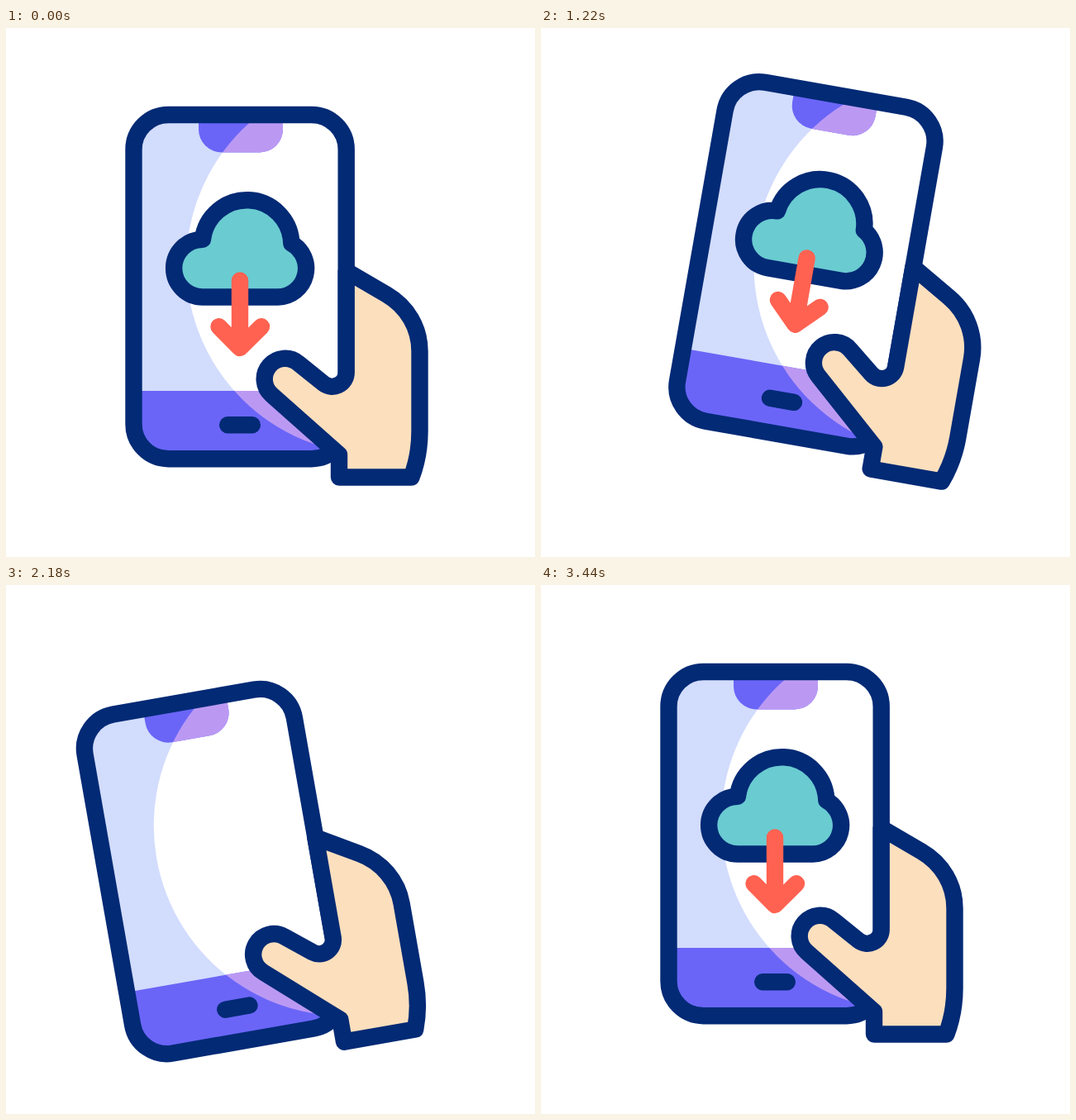
These frames come from a looping animation (640x640 px, 3620 ms). An HTML page:

```html
<!DOCTYPE html>
<html lang="en">
<head>
<meta charset="utf-8">
<title>Cloud download</title>
<style>
  html, body { margin: 0; height: 100%; overflow: hidden; background: #fff; }
  svg { display: block; width: 100%; height: 100%; }
  .line { stroke: #022a75; stroke-width: 20.4; stroke-linecap: round; stroke-linejoin: round; }
  .violet { fill: #6a65f7; }
  .lilac { fill: #bb99f3; }
</style>
</head>
<body>
<svg viewBox="0 0 640 640">
  <defs>
    <clipPath id="screen"><rect x="154.5" y="105" width="257.2" height="416.2" rx="42"/></clipPath>
    <clipPath id="shine"><circle cx="448" cy="286" r="230"/></clipPath>
    <path id="notch" d="M233 100H335V122.500A28 28 0 0 1 307 150.500H261A28 28 0 0 1 233 122.500Z"/>
    <rect id="band" x="150" y="439" width="266" height="90"/>
  </defs>
  <g id="scene">
    <g clip-path="url(#screen)">
      <rect x="150" y="100" width="266" height="426" fill="#d2dcfd"/>
      <circle cx="448" cy="286" r="230" fill="#fff"/>
      <use href="#notch" class="violet"/>
      <use href="#notch" class="lilac" clip-path="url(#shine)"/>
      <path id="cloud" class="line" fill="#6acbd1"
        d="M238 325.500A34.900 34.900 0 0 1 238 255.700A53.850 53.850 0 0 1 345.300 260.500A34.700 34.700 0 0 1 329 325.500Z"/>
      <path id="arrow" fill="none" stroke="#ff6251" stroke-width="20.4" stroke-linecap="round" stroke-linejoin="round"
        d="M283 305.500V387M257.500 361.300L283 387L309 361.300"/>
      <use href="#band" class="violet"/>
      <use href="#band" class="lilac" clip-path="url(#shine)"/>
      <rect x="258" y="470" width="50" height="20.400" rx="10.200" fill="#022a75"/>
    </g>
    <rect class="line" fill="none" x="154.500" y="105" width="257.200" height="416.200" rx="42"/>
    <path class="line" fill="#fcdfbd"
      d="M411.700 294L460.500 322.500C485.500 337 500.500 363 500.500 391V488C500.500 508 497.500 525 490.500 543.500H403V516.200L321.500 443.800A25 25 0 0 1 353.900 405.700L384.200 430.100A17 17 0 0 0 411.700 417Z"/>
  </g>
</svg>
<script>
  const LOOP = 3620;
  const [scene, cloud, arrow] = ['scene', 'cloud', 'arrow'].map(id => document.getElementById(id));

  // Eased progress from 0 to 1 between two times.
  const ease = (t, from, to) => {
    const u = Math.min(1, Math.max(0, (t - from) / (to - from)));
    return u * u * (3 - 2 * u);
  };

  function draw(now) {
    const t = now % LOOP;
    const tilt = 10 * ease(t, 200, 1200) - 20 * ease(t, 1200, 2200) + 10 * ease(t, 2200, 3200);
    scene.setAttribute('transform', `rotate(${tilt} 458.5 513.5)`);

    cloud.setAttribute('opacity', 1 - ease(t, 1700, 2180) + ease(t, 2200, 2700));

    // The arrow drops behind the band, then fades back in from above.
    const back = ease(t, 2700, 3440);
    const shift = t < 2200 ? 147 * ease(t, 1200, 2200) : -37 * (1 - back);
    arrow.setAttribute('transform', `translate(0 ${shift})`);
    arrow.setAttribute('opacity', t < 2200 ? 1 : back);

    requestAnimationFrame(draw);
  }
  draw(performance.now());
</script>
</body>
</html>
```
